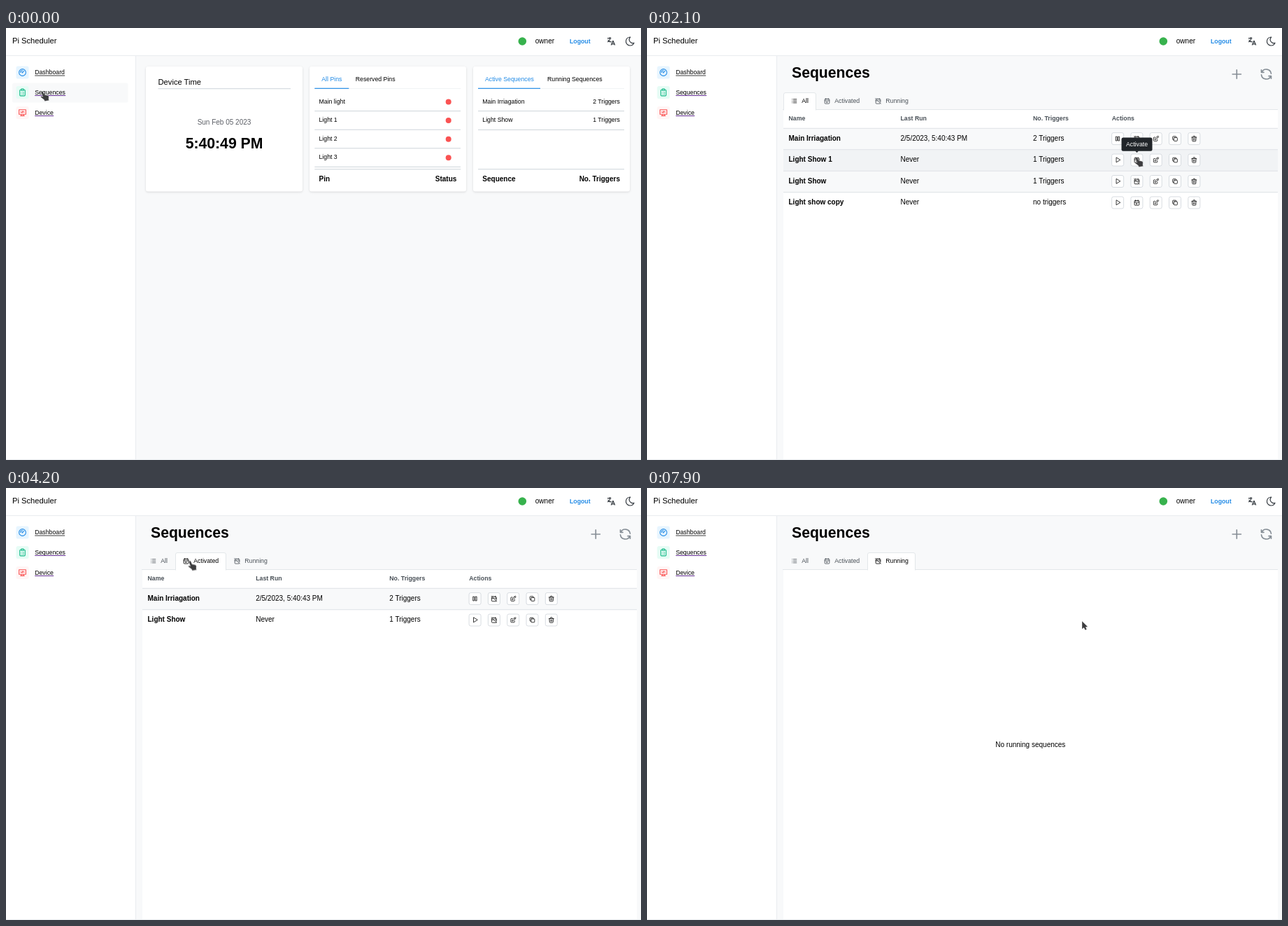
An HTML page for the animation above (8000 ms loop, 908 px wide and 617 px high).

```html
<!DOCTYPE html>
<html lang="en">
<head>
<meta charset="utf-8">
<title>Pi Scheduler</title>
<style>
html, body { margin: 0; width: 100%; height: 100%; overflow: hidden; background: #f8f9fa; }
svg { display: block; font-family: "Liberation Sans", Arial, sans-serif; }
.on, #cursor { animation-duration: 8s; animation-delay: -20ms; animation-iteration-count: infinite; }
.on { animation-timing-function: step-end; }
#cursor { animation-name: travel; }
.card { fill: #fff; filter: drop-shadow(0 1px 1.5px rgba(0, 0, 0, .13)); }
.icon { fill: none; stroke-linecap: round; stroke-linejoin: round; }
</style>
</head>
<body>
<svg id="stage" width="908" height="617" viewBox="0 0 908 617"></svg>
<script>
const LOOP = 8000;
const S = 8.74, M = 10, L = 11.2, XL = 21.2;
const BLUE = '#228be6', GRAY = '#495057', LINE = '#ced4da', PALE = '#e9ecef';
let css = '', count = 0;

const icons = {
  language: 'M4 5h7M9 3v2c0 4.4-2.2 8-5 8M5 9c0 2.1 3 3.9 6.7 4M12 20l4-9l4 9M19.1 18h-6.2',
  moon: 'M12 3h.4a7.5 7.5 0 0 0 7.9 12.4a9 9 0 1 1-8.3-12.4z',
  gauge: 'M3 12a9 9 0 1 0 18 0a9 9 0 1 0-18 0M11 12a1 1 0 1 0 2 0a1 1 0 1 0-2 0M13.4 10.6l2.6-2.6M7 12a5 5 0 0 1 5-5',
  clipboard: 'M9 5h-2a2 2 0 0 0-2 2v12a2 2 0 0 0 2 2h10a2 2 0 0 0 2-2v-12a2 2 0 0 0-2-2h-2M9 3h6v4h-6zM9 12h.01M13 12h2M9 16h.01M13 16h2',
  monitor: 'M3 4h18v12h-18zM7 20h10M9 16v4M15 16v4M7 10h2l2 2l2-4l1 2h3',
  plus: 'M12 5v14M5 12h14',
  refresh: 'M20 11a8.1 8.1 0 0 0-15.5-2m-.5-4v4h4M4 13a8.1 8.1 0 0 0 15.5 2m.5 4v-4h-4',
  list: 'M9 6h11M9 12h11M9 18h11M5 6v.01M5 12v.01M5 18v.01',
  calendar: 'M6 5h12a2 2 0 0 1 2 2v12a2 2 0 0 1-2 2h-12a2 2 0 0 1-2-2v-12a2 2 0 0 1 2-2zM16 3v4M8 3v4M4 11h16M11 15h2v2h-2z',
  calendarOff: 'M19.8 19.8a2 2 0 0 1-1.8 1.2h-12a2 2 0 0 1-2-2v-12a2 2 0 0 1 1.2-1.8m3.8-.2h9a2 2 0 0 1 2 2v9M16 3v4M8 3v1M4 11h7m4 0h5M3 3l18 18',
  play: 'M7 4v16l13-8z',
  pause: 'M6 5h4v14h-4zM14 5h4v14h-4z',
  edit: 'M9 7h-3a2 2 0 0 0-2 2v9a2 2 0 0 0 2 2h9a2 2 0 0 0 2-2v-3M9 15h3l8.5-8.5a1.5 1.5 0 0 0-3-3l-8.5 8.5v3M16 5l3 3',
  copy: 'M10 8h8a2 2 0 0 1 2 2v8a2 2 0 0 1-2 2h-8a2 2 0 0 1-2-2v-8a2 2 0 0 1 2-2zM16 8v-2a2 2 0 0 0-2-2h-8a2 2 0 0 0-2 2v8a2 2 0 0 0 2 2h2',
  trash: 'M4 7h16M10 11v6M14 11v6M5 7l1 12a2 2 0 0 0 2 2h8a2 2 0 0 0 2-2l1-12M9 7v-3a1 1 0 0 1 1-1h4a1 1 0 0 1 1 1v3'
};

const text = (x, y, str, size = S, fill = '#000', bold = false, anchor = 'start') =>
  `<text x="${x}" y="${y}" font-size="${size}" fill="${fill}" text-anchor="${anchor}"${bold ? ' font-weight="700"' : ''}>${str}</text>`;
const rect = (x, y, w, h, fill, r = 0, more = '') =>
  `<rect x="${x}" y="${y}" width="${w}" height="${h}" rx="${r}" fill="${fill}" ${more}/>`;
const hline = (x1, x2, y, color = LINE, w = 1) => rect(x1, y - w / 2, x2 - x1, w, color);
const dot = (x, y, r, fill) => `<circle cx="${x}" cy="${y}" r="${r}" fill="${fill}"/>`;
const icon = (name, cx, cy, size, color = '#111', weight = 2) =>
  `<path class="icon" d="${icons[name]}" stroke="${color}" stroke-width="${weight}" transform="translate(${cx - size / 2} ${cy - size / 2}) scale(${size / 24})"/>`;
const pct = ms => ms / LOOP * 100 + '%';

// Wraps markup so that it is visible only during the given [from, to] spans.
function during(spans, body) {
  const name = 'on' + count++;
  const keys = spans.map(([a, b]) => `${pct(a)}{visibility:visible}${pct(b)}{visibility:hidden}`);
  css += `@keyframes ${name}{0%{visibility:hidden}${keys.join('')}}`;
  return `<g class="on" style="animation-name:${name}">${body}</g>`;
}

function frame() {
  const nav = [
    ['Dashboard', 'gauge', 63.5, BLUE, '#e7f5ff', 43, '#222'],
    ['Sequences', 'clipboard', 92, '#12b886', '#e6fcf5', 44, '#551a8b'],
    ['Device', 'monitor', 121, '#fa5252', '#fff5f5', 27, '#551a8b']
  ];
  return rect(0, 0, 908, 39, '#fff') + rect(0, 39, 185, 578, '#fff') +
    hline(0, 908, 39.5, PALE) + rect(185, 40, 1, 577, PALE) +
    during([[0, 800]], rect(9, 78.5, 165.5, 28, '#f8f9fa', 2.5)) +
    text(9, 22, 'Pi Scheduler', L) + dot(738.3, 19, 5.8, '#37b24d') +
    text(756.8, 22, 'owner', M) + text(806, 21.5, 'Logout', S, BLUE, true) +
    icon('language', 865.5, 19, 15, '#343a40') + icon('moon', 892.5, 19, 16, '#343a40', 1.8) +
    nav.map(([label, ic, y, color, bg, w, under]) =>
      rect(14.5, y - 9, 18, 18, bg, 2.5) + icon(ic, 23.5, y, 13, color) +
      text(41.2, y + 2.6, label) + hline(41.2, 41.2 + w, y + 4.5, under, .9)).join('');
}

function dashboard() {
  const pins = ['Main light', 'Light 1', 'Light 2', 'Light 3'];
  const active = [['Main Irriagation', 2], ['Light Show', 1]];
  const tabs = (x, w, first, x2, second) =>
    hline(x, x + 209, 86.5, '#f1f3f5') + hline(x, x + w, 86.3, BLUE, 1.2) +
    text(x + 10, 76.2, first, S, BLUE) + text(x2, 76.2, second);
  const foot = (x, a, b) => hline(x, x + 209, 201.7) +
    text(x + 6.3, 219, a, M, '#000', true) + text(x + 203, 219, b, M, '#000', true, 'end');
  return [200, 434, 668].map(x => `<rect class="card" x="${x}" y="55" width="224" height="178.5" rx="3"/>`).join('') +
    text(217.5, 80.5, 'Device Time', L) + hline(217.5, 407, 86.7) +
    text(312, 137.6, 'Sun Feb 05 2023', M, '#5c5f66', false, 'middle') +
    text(312, 171.6, '5:40:49 PM', XL, '#000', true, 'middle') +
    tabs(441.3, 49, 'All Pins', 499.8, 'Reserved Pins') +
    pins.map((p, i) => {
      const y = 107.6 + 26.6 * i;
      return text(447.5, y, p) + dot(632.7, y - 2.1, 4, '#fa5252') + hline(441.3, 650, y + 11);
    }).join('') + foot(441.3, 'Pin', 'Status') +
    tabs(675, 89, 'Active Sequences', 774, 'Running Sequences') +
    active.map(([n, c], i) => {
      const y = 107.6 + 26.8 * i;
      return text(681.3, y, n) + text(878, y, c + ' Triggers', S, '#000', false, 'end') + hline(675, 884, y + 11);
    }).join('') + foot(675, 'Sequence', 'No. Triggers');
}

function sequences() {
  const tabs = [
    ['All', 'list', 195.5, 46, [400, 4200]],
    ['Activated', 'calendar', 242.5, 72, [4200, 6100]],
    ['Running', 'calendarOff', 315.5, 68, [6100, LOOP]]
  ];
  const label = ([name, ic, x], color) => icon(ic, x + 15, 104.3, 10, color) + text(x + 25.8, 107.3, name, S, color);
  return text(207, 70.5, 'Sequences', XL, '#000', true) +
    icon('plus', 843.3, 66, 21, '#868e96', 1.9) + icon('refresh', 885.5, 66, 21, '#868e96', 1.9) +
    rect(195, 117, 707, 499, '#fff') + hline(194, 902, 116.5, '#e3e7ea') +
    tabs.map(t => label(t, GRAY) + during([t[4]],
      `<path d="M${t[2]} 117.5v-22.5q0-2.5 2.5-2.5h${t[3] - 5}q2.5 0 2.5 2.5v22.5" fill="#fff" stroke="#e3e7ea"/>` +
      label(t, '#000'))).join('');
}

const rows = {
  main: ['Main Irriagation', '2/5/2023, 5:40:43 PM', '2 Triggers', 'pause', 'calendarOff'],
  show1: ['Light Show 1', 'Never', '1 Triggers', 'play', 'calendar'],
  show: ['Light Show', 'Never', '1 Triggers', 'play', 'calendarOff'],
  copy: ['Light show copy', 'Never', 'no triggers', 'play', 'calendar']
};

function table(keys, [runX, trigX, actX], hovers) {
  const heads = [[202.5, 'Name'], [runX, 'Last Run'], [trigX, 'No. Triggers'], [actX, 'Actions']];
  return heads.map(([x, h]) => text(x, 131.8, h, S, GRAY, true)).join('') +
    keys.map((key, i) => {
      const y = 143.3 + 30.45 * i;
      const [name, run, trig, ...acts] = rows[key];
      return (i % 2 ? '' : rect(195, y, 707, 30.45, '#f8f9fa')) +
        (hovers[i] ? during(hovers[i], rect(195, y, 707, 30.45, '#f1f3f5')) : '') +
        hline(195, 902, y, '#dee2e6') +
        text(202.5, y + 17.6, name, M, '#000', true) + text(runX, y + 17.6, run, M) + text(trigX, y + 17.6, trig, M) +
        [...acts, 'edit', 'copy', 'trash'].map((a, j) => {
          const cx = actX + 8.3 + 27.3 * j, cy = y + 14.8;
          return rect(cx - 8.5, cy - 8.5, 17, 17, '#fff', 2.5, `stroke="${LINE}" stroke-width=".8"`) + icon(a, cx, cy, 10);
        }).join('');
    }).join('');
}

const tip = (row, label, w) => {
  const y = 126 + 30.45 * row;
  return rect(700.5 - w / 2, y, w, 19.2, '#212529', 2.5) + `<path d="M698 ${y + 19}h5l-2.5 2.5z" fill="#212529"/>` +
    text(700.5, y + 12.4, label, S, '#fff', false, 'middle');
};

// Pointer stops: time, x, y. It advances every 100 ms.
const stops = [
  [0, 49, 90], [100, 51, 100.5], [700, 51, 100.5], [1200, 430, 131], [1500, 695, 216.5],
  [2100, 697, 184], [2600, 698.5, 156], [3500, 698.5, 156], [4100, 260, 103.5], [4200, 260, 103.5],
  [4400, 303, 107], [4900, 338, 112.5], [6000, 338, 112.5], [6100, 401, 143], [6500, 560, 223],
  [6900, 675, 162.5], [7000, 676, 163.5], [7200, 676, 163.5], [7900, 622, 190], [8000, 622, 190]
];
css += '@keyframes travel{' + stops.map(([t, x, y], i) => {
  const n = i + 1 < stops.length ? (stops[i + 1][0] - t) / 100 : 1;
  return `${pct(t)}{transform:translate(${x}px,${y}px);animation-timing-function:steps(${n},end)}`;
}).join('') + '}';

const shape = d => `<path d="${d}" fill="#3d3d3f" stroke="#fff" stroke-opacity=".6" stroke-width=".6"/>`;
const hand = shape('M2 .8C3 .2 4 .6 4.4 1.6L6 5.3L10.6 6.2C11.8 6.6 12.2 7.5 12.2 8.5L12 11.5L12.6 13.4L6.3 14.5L5.5 12.6L1 9C.2 8.2 1.2 7 2.4 7.6L3.7 8.2L1.5 2.3Z');
const arrow = shape('M0 0V11.6L2.7 9.6L4.6 13L6.9 12L5.3 8.8L8.3 8.2Z');

const wide = [362.5, 552, 664.8], narrow = [357.2, 548.3, 662.3];
const note = (y, str) => text(548.3, y, str, M, '#000', false, 'middle');

document.getElementById('stage').innerHTML =
  rect(0, 0, 908, 617, '#f8f9fa') + frame() +
  during([[0, 400]], dashboard()) +
  during([[400, LOOP]], sequences()) +
  during([[400, 700]], note(354, 'No Sequences defined') + text(548.3, 382, 'Add new Sequence', S, BLUE, true, 'middle')) +
  during([[700, 4200]], table(['main', 'show1', 'show', 'copy'], wide,
    [[[1300, 1400], [2300, 3700]], [[1400, 1500], [1800, 2300]], [[1500, 1800]]])) +
  during([[4200, 6100]], table(['main', 'show'], narrow, [])) +
  during([[6100, 7400]], table(['main'], narrow, [[[6200, 6300], [6900, 7400]]])) +
  during([[7400, LOOP]], note(370, 'No running sequences')) +
  during([[1600, 1800]], tip(2, 'Deactivate', 53.5)) +
  during([[1800, 2300]], tip(1, 'Activate', 44)) +
  during([[2300, 3600]], tip(0, 'Deactivate', 53.5)) +
  hline(0, 908, 616.5, PALE) +
  '<g id="cursor">' +
  during([[0, 800], [1300, 3700], [4000, 6300], [6900, 7400]], hand) +
  during([[800, 1300], [3700, 4000], [6300, 6900], [7400, LOOP]], arrow) + '</g>';

const style = document.createElement('style');
style.textContent = css;
document.head.append(style);
</script>
</body>
</html>
```
